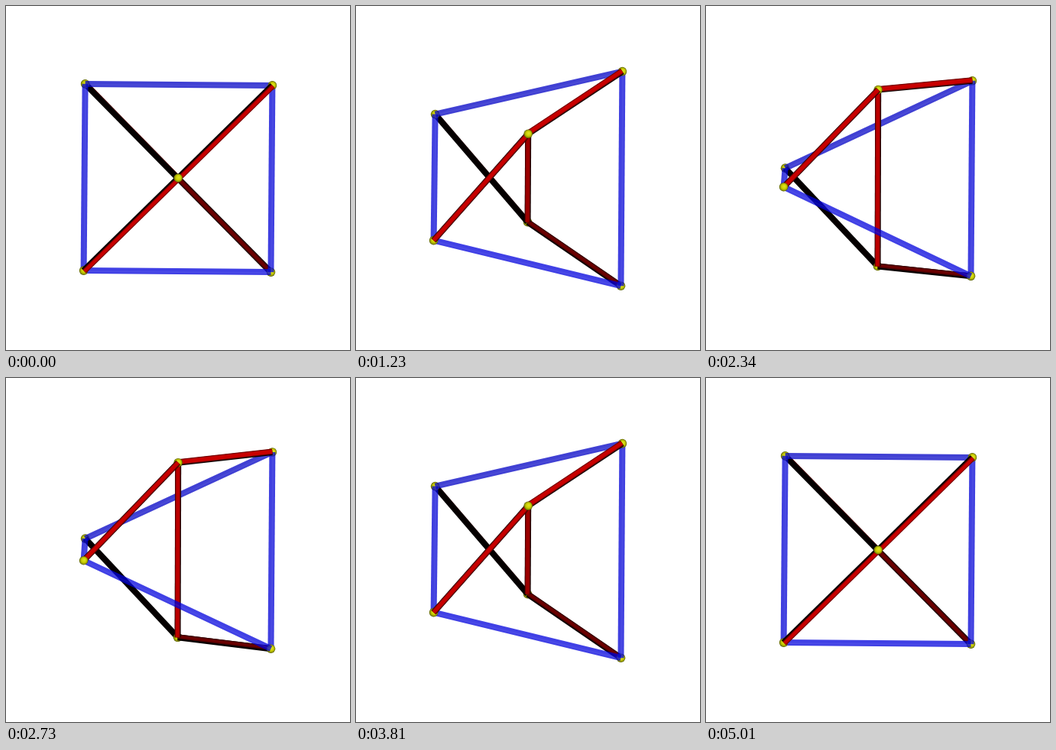
An HTML page with a canvas that plays this animation: 450x450 px, repeating every 5040 ms.

```html
<!DOCTYPE html>
<html>
<head>
<meta charset="utf-8">
<style>
html, body { margin: 0; width: 100%; height: 100%; overflow: hidden; background: #fff; }
canvas { display: block; }
</style>
</head>
<body>
<canvas id="stage" width="450" height="450"></canvas>
<script>
const ctx = document.getElementById('stage').getContext('2d');
const STEP = 30, STEPS = 168, HOLD = 12, RADIUS = 141, RAD = Math.PI / 180;

// x on stage, angle around the horizontal axis, small vertical skew
const nodes = {
  A: [103.6, 30, -1], D: [101.6, 210, -1],
  B: [348.4, -30, 1], C: [346.5, 150, 1],
  P: [225.2, -90, 0], Q: [224.6, 90, 0]
};

const mix = (a, b, k) => a + (b - a) * Math.max(0, Math.min(1, k));

function project([x, angle, skew], turn) {
  const a = (angle + turn) * RAD;
  return {
    x,
    y: 225 - RADIUS * Math.cos(a) + skew * Math.cos(turn * RAD),
    z: -RADIUS * Math.sin(a)
  };
}

// Line shifted sideways; positive shift goes downwards
function line(p, q, width, color, shift = 0) {
  let dx = q.x - p.x, dy = q.y - p.y;
  const len = Math.hypot(dx, dy);
  if (len < 0.5) return;
  if (dx < 0) { dx = -dx; dy = -dy; }
  const ox = -dy / len * shift, oy = dx / len * shift;
  ctx.strokeStyle = color;
  ctx.lineWidth = width;
  ctx.beginPath();
  ctx.moveTo(p.x + ox, p.y + oy);
  ctx.lineTo(q.x + ox, q.y + oy);
  ctx.stroke();
}

function ball({ x, y }) {
  const g = ctx.createRadialGradient(x + 1, y - 1, 0, x, y, 5.9);
  g.addColorStop(0, '#dfe22a');
  g.addColorStop(0.5, '#cdd200');
  g.addColorStop(0.8, '#969b00');
  g.addColorStop(1, '#454c00');
  ctx.fillStyle = g;
  ctx.beginPath();
  ctx.arc(x, y, 5.8, 0, 7);
  ctx.fill();
}

function rod(p, q, red, width, shift) {
  line(p, q, 8, '#080000');
  line(p, q, width + 1.4, `rgb(${red * 0.6},0,0)`, shift);
  line(p, q, width - 1, `rgb(${red},0,0)`, shift);
}

function glass(p, q, blue) {
  line(p, q, 8, `rgba(0,0,${blue},.75)`);
  line(p, q, 2, 'rgba(255,255,255,.05)', 0.8);
}

function draw(turn) {
  const n = {};
  for (const k in nodes) n[k] = project(nodes[k], turn);
  const { A, B, C, D, P, Q } = n;
  const parts = [];
  const edge = (p, q, paint) => parts.push({ z: (p.z + q.z) / 2, paint });
  const k = turn / 24;

  edge(A, B, () => glass(A, B, 196));
  edge(B, C, () => glass(B, C, 214));
  edge(C, D, () => glass(C, D, 220));
  edge(D, A, () => glass(D, A, 212));
  edge(P, Q, () => rod(P, Q, mix(150, 188, (turn - 20) / 25), 5.6, -0.3));
  edge(P, B, () => rod(P, B, 200, mix(5.2, 6, k), mix(1.4, -0.8, k)));
  edge(P, D, () => rod(P, D, 200, mix(5.2, 5.8, k), mix(1.4, 0, k)));
  edge(Q, C, () => rod(Q, C, 106, mix(5.2, 4.4, turn / 50), mix(0, -1.1, turn / 40)));
  edge(Q, A, () => {
    line(Q, A, 8, '#050000');
    line(Q, A, 0.8, `rgba(130,0,0,${mix(0.8, 0, turn / 35)})`, -3.7);
  });
  for (const key in n) parts.push({ z: n[key].z, paint: () => ball(n[key]) });

  ctx.clearRect(0, 0, 450, 450);
  parts.sort((a, b) => a.z - b.z).forEach(part => part.paint());
}

const start = performance.now();
function tick() {
  const i = Math.floor((performance.now() - start) / STEP) % STEPS;
  const run = Math.max(0, Math.min(i, STEPS - i) - HOLD);
  draw(run * 60 / (STEPS / 2 - HOLD));
  requestAnimationFrame(tick);
}
tick();
</script>
</body>
</html>
```
